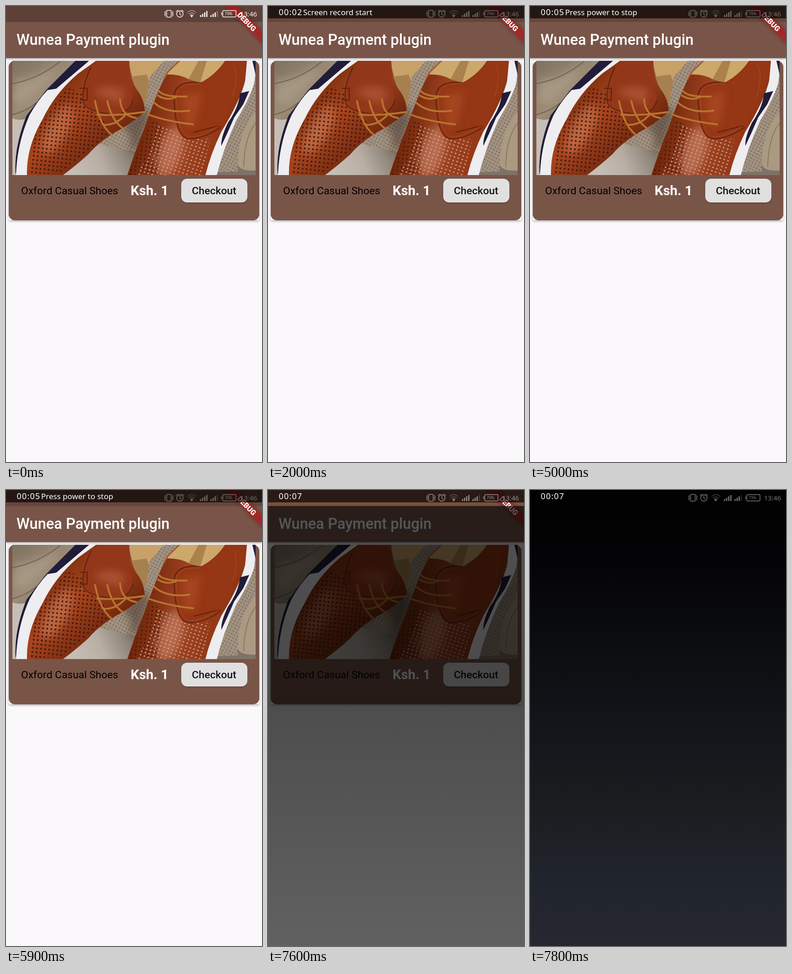
An HTML page that plays this animation: 561x998 px, repeating every 8 s.

```html
<!DOCTYPE html>
<html lang="en">
<head>
<meta charset="utf-8">
<title>Payment plugin demo</title>
<style>
  html, body { margin: 0; width: 100%; height: 100%; overflow: hidden; background: #faf8fb; }
  svg { display: block; width: 561px; height: 998px; }
  text { font-family: Roboto, sans-serif; }
  .hand { font-family: "Noto Sans", sans-serif; fill: #fff; }
  .line { fill: none; stroke-linecap: round; stroke-linejoin: round; }
</style>
</head>
<body>
<svg viewBox="0 0 561 998">
  <defs>
    <filter id="cardShadow" x="-5%" y="-5%" width="110%" height="112%">
      <feDropShadow dx="0" dy="2" stdDeviation="2.2" flood-opacity=".32"/>
    </filter>
    <filter id="buttonShadow" x="-5%" y="-10%" width="110%" height="130%">
      <feDropShadow dx="0" dy="1.5" stdDeviation="1.2" flood-opacity=".3"/>
    </filter>
    <filter id="ribbonShadow" x="-20%" y="-60%" width="140%" height="220%">
      <feDropShadow dx="0" dy="0" stdDeviation="4" flood-opacity=".5"/>
    </filter>
    <filter id="soft" x="-40%" y="-40%" width="180%" height="180%"><feGaussianBlur stdDeviation="9"/></filter>
    <clipPath id="photo"><path d="M14 120H547V370H14Z"/></clipPath>
    <clipPath id="leftClip"><use href="#leftUpper"/></clipPath>
    <clipPath id="rightClip"><use href="#rightUpper"/></clipPath>
    <linearGradient id="floor" gradientUnits="userSpaceOnUse" x1="150" y1="370" x2="280" y2="310">
      <stop offset="0" stop-color="#c6beb5"/><stop offset=".45" stop-color="#b8aea4"/>
      <stop offset="1" stop-color="#7f7367"/>
    </linearGradient>
    <linearGradient id="leftLeather" gradientUnits="userSpaceOnUse" x1="80" y1="210" x2="205" y2="335">
      <stop offset="0" stop-color="#80300f"/><stop offset=".4" stop-color="#a8451f"/>
      <stop offset="1" stop-color="#6c250d"/>
    </linearGradient>
    <linearGradient id="rightLeather" gradientUnits="userSpaceOnUse" x1="290" y1="270" x2="480" y2="310">
      <stop offset="0" stop-color="#702609"/><stop offset=".45" stop-color="#a04322"/>
      <stop offset="1" stop-color="#923513"/>
    </linearGradient>
    <linearGradient id="tanShoe" x1="0" y1="0" x2="1" y2="1">
      <stop offset="0" stop-color="#7f7160"/><stop offset=".5" stop-color="#9c8c77"/>
      <stop offset="1" stop-color="#675949"/>
    </linearGradient>
    <pattern id="mesh" width="7" height="7" patternUnits="userSpaceOnUse" patternTransform="rotate(28)">
      <path fill="#a19180" d="M0 0H7V7H0Z"/><circle cx="3.5" cy="3.5" r="1.6" fill="#776756"/>
    </pattern>
    <pattern id="holes" width="9" height="9" patternUnits="userSpaceOnUse" patternTransform="rotate(6)">
      <circle cx="4.5" cy="4.5" r="2" fill="#401408"/>
    </pattern>
    <pattern id="paleHoles" width="9" height="8" patternUnits="userSpaceOnUse" patternTransform="rotate(18)">
      <ellipse cx="4.5" cy="4" rx="2" ry="1.4" fill="#c4a595"/>
    </pattern>
    <linearGradient id="dimFill" x2="0" y2="1">
      <stop offset="0" stop-opacity=".66"/><stop offset=".45" stop-opacity=".69"/>
      <stop offset="1" stop-opacity=".61"/>
    </linearGradient>
    <linearGradient id="nightFill" x2="0" y2="1">
      <stop offset="0" stop-color="#020001"/><stop offset=".15" stop-color="#040406"/>
      <stop offset=".3" stop-color="#0a0b0d"/><stop offset=".52" stop-color="#12161a"/>
      <stop offset=".7" stop-color="#1b1d20"/><stop offset=".85" stop-color="#20242c"/>
      <stop offset="1" stop-color="#262831"/>
    </linearGradient>
  </defs>

  <path fill="#faf8fb" d="M0 0H561V998H0Z"/>

  <!-- app bar -->
  <path fill="#795548" d="M0 0H561V114H0Z" filter="url(#cardShadow)"/>
  <path id="statusBar" fill="#5d4037" d="M0 0H561V35H0Z"/>
  <text x="23" y="85" font-size="32.7" font-weight="500" fill="#fff">Wunea Payment plugin</text>

  <!-- product card -->
  <rect x="6" y="120" width="549" height="349" rx="3" fill="#fff" filter="url(#cardShadow)"/>
  <rect x="6" y="120" width="549" height="349" rx="13" fill="#795548"/>

  <g clip-path="url(#photo)">
    <path fill="url(#floor)" d="M14 120H547V370H14Z"/>
    <path fill="url(#tanShoe)" d="M14 120H165L90 190 48 246Q30 252 14 246Z"/>
    <path fill="#b3a48f" opacity=".6" filter="url(#soft)" d="M20 160Q60 165 115 128L95 165 40 215 14 210Z"/>
    <path class="line" stroke="#6d604f" stroke-width="2" d="M14 170Q70 160 118 122M14 238Q45 230 66 212"/>
    <path fill="url(#mesh)" d="M300 150 345 120H385L350 160 322 215 288 320Q245 312 200 300L250 262Z"/>
    <path fill="#3c2c20" opacity=".5" filter="url(#soft)" d="M303 215 315 240 292 310 268 320Q285 270 250 268Z"/>
    <path fill="url(#mesh)" d="M547 140V262Q505 300 508 362L455 364 490 270Z"/>
    <path fill="#ab9a82" d="M547 232Q508 276 508 345Q510 362 547 360Z"/>
    <path class="line" stroke="#89785f" stroke-width="2" d="M547 256Q522 288 521 352"/>

    <!-- left shoe -->
    <path fill="#211c38" d="M152 120H200L110 188 60 240 30 330 21 369Q17 310 45 240L88 184Z"/>
    <path fill="#eeedf0" d="M182 120H204Q140 165 108 212Q60 290 47 370H22Q24 300 52 238Q70 206 91 184L110 181Z"/>
    <path fill="#c8a168" d="M268 120H346L316 154 305 216 283 182Z"/>
    <path fill="#a6804f" d="M272 155 308 150 314 165 305 216 283 182Z"/>
    <path id="leftUpper" fill="url(#leftLeather)" d="M197 120H270Q272 160 286 182Q303 203 304 230Q290 246 254 268Q206 294 180 325Q152 350 125 370H46Q44 310 80 248Q108 190 158 148Z"/>
    <g clip-path="url(#leftClip)">
      <ellipse cx="112" cy="270" rx="22" ry="60" transform="rotate(28 112 270)" fill="#cf8360" opacity=".55" filter="url(#soft)"/>
      <path fill="url(#holes)" d="M133 178 165 188 176 226 208 240 228 276 178 320 120 367H50Q50 300 82 248Z"/>
      <path fill="#93371a" d="M186 135Q165 180 170 212Q176 232 245 238Q272 230 278 206Q270 160 270 120H210Z"/>
      <path fill="#bd6844" opacity=".55" filter="url(#soft)" d="M190 190Q220 165 262 185L250 215Z"/>
      <path class="line" stroke="#5b200d" stroke-width="2" d="M186 135Q164 180 170 212Q176 232 245 238Q272 230 278 206M162 180H178V206H162"/>
    </g>
    <path class="line" stroke="#b9742f" stroke-width="4" d="M195 208Q206 262 232 282M222 208Q232 252 257 268M250 204Q252 240 285 245M200 238Q250 240 303 232M212 260Q240 262 262 238"/>

    <!-- right shoe -->
    <path fill="#cca86b" d="M352 150 380 120H486L455 155 425 170Z"/>
    <path fill="#ab824b" d="M400 160 422 120H440L425 170Z"/>
    <path id="rightUpper" fill="url(#rightLeather)" d="M350 150Q378 148 400 160Q420 168 428 167Q460 150 480 120H530Q526 172 506 212Q470 285 440 370H266Q282 320 303 268Q325 205 346 160Z"/>
    <path class="line" stroke="#a9572e" stroke-width="3" d="M346 160 354 145 380 120"/>
    <g clip-path="url(#rightClip)">
      <ellipse cx="360" cy="318" rx="25" ry="58" transform="rotate(18 360 318)" fill="#d18c72" opacity=".55" filter="url(#soft)"/>
      <path fill="url(#holes)" opacity=".8" d="M318 250 346 262 330 370H268Z"/>
      <path fill="url(#paleHoles)" d="M334 258 382 282Q405 294 448 290L428 370H282Q320 325 334 258Z"/>
      <path fill="#953614" d="M428 167Q370 162 368 198Q370 282 396 290Q425 295 470 266L540 120H480Z"/>
      <path fill="#b6572f" opacity=".5" filter="url(#soft)" d="M385 195 430 185 415 260 392 268Z"/>
      <path class="line" stroke="#5b200d" stroke-width="2" d="M428 167Q370 162 368 198Q370 282 396 290Q425 295 470 266M412 276 468 262"/>
      <path class="line" stroke="#b4623c" stroke-width="1" stroke-dasharray="3 3" d="M425 171Q375 168 373 198Q376 278 399 285Q425 290 468 260M500 130Q510 160 496 200"/>
    </g>
    <path class="line" stroke="#b9742f" stroke-width="4" d="M335 186Q346 200 396 198M333 196Q352 208 372 200M325 212Q352 236 402 229M313 238Q350 252 410 259"/>
    <path fill="#eeedf0" d="M528 120H541Q550 145 543 172Q535 200 505 250Q477 310 462 370H437Q448 325 472 275Q512 210 524 165Z"/>
    <path fill="#211c38" d="M513 191 533 186 520 215 500 244 486 276 472 306Q470 290 486 256Q510 222 513 191Z"/>
    <path fill="#211c38" d="M540 120H547V150Z"/>
  </g>

  <text x="33" y="412" font-size="22.9">Oxford Casual Shoes</text>
  <text x="273" y="414" font-size="29.4" font-weight="700" fill="#fff">Ksh. 1</text>
  <rect x="384" y="378" width="145" height="52" rx="13" fill="#e0e0e0" filter="url(#buttonShadow)"/>
  <text x="456" y="412" font-size="22.9" font-weight="500" text-anchor="middle" fill="#141414">Checkout</text>

  <!-- debug ribbon -->
  <g transform="translate(527.5 34.5) rotate(45)">
    <path d="M-65 -9.400H65V9.400H-65Z" fill="#b71c1c" fill-opacity=".64" filter="url(#ribbonShadow)"/>
    <text y="5.700" font-size="16" font-weight="900" text-anchor="middle" fill="#fff">DEBUG</text>
  </g>

  <path id="recordBar" d="M0 0H561V27H0Z"/>
  <path id="dim" fill="url(#dimFill)" d="M0 35H561V998H0Z"/>
  <path id="night" fill="url(#nightFill)" d="M0 0H561V998H0Z"/>

  <!-- status icons -->
  <g id="icons">
    <g class="line" stroke="#fff" stroke-width="1.500">
      <rect x="352" y="9.500" width="10" height="15" rx="1.500"/>
      <path d="M349 12l-1 3 1.500 2-1.500 2 1 3M365 12l1 3-1.500 2 1.500 2-1 3"/>
      <circle cx="381" cy="17.500" r="7"/>
      <path d="M381 13V18L384 20M373 12 377 9M389 12 385 9"/>
      <path opacity=".55" d="M398 14Q407 6 416 14M401 17.500Q407 12 413 17.500"/>
      <path d="M404 20.500Q407 18 410 20.500"/>
      <rect x="475" y="10" width="29" height="14" rx="2"/>
      <path d="M472.500 14.500V19.500"/>
    </g>
    <circle cx="407" cy="22.500" r="2" fill="#fff"/>
    <g id="signal" fill="#fff"></g>
    <text class="hand" x="488" y="20" font-size="8.500" text-anchor="middle">79%</text>
    <text class="hand" x="513" y="22.500" font-size="14.500">13:46</text>
  </g>

  <g id="recordText">
    <text id="counter" class="hand" x="23.500" y="20" font-size="18" letter-spacing="1.200"></text>
    <text id="message" class="hand" x="77" y="20" font-size="17"></text>
  </g>
</svg>

<script>
const LOOP = 8000;

// Each row holds from its time until the next one.
const steps = [
  { at: 0,    recording: false, icons: 0.95, message: "", dim: 0, night: 0 },
  { at: 900,  recording: true,  icons: 0.36, message: "Screen record start", dim: 0, night: 0 },
  { at: 5000, recording: true,  icons: 0.36, message: "Press power to stop", dim: 0, night: 0 },
  { at: 7000, recording: true,  icons: 0.36, message: "", dim: 0, night: 0 },
  { at: 7600, recording: true,  icons: 0.5,  message: "", dim: 1, night: 0 },
  { at: 7700, recording: true,  icons: 0.48, message: "", dim: 1, night: 0.55 },
  { at: 7800, recording: true,  icons: 0.46, message: "", dim: 1, night: 1 },
];

const el = id => document.getElementById(id);

function addSignal(x, lastOpacity) {
  for (let i = 0; i < 4; i++) {
    const bar = document.createElementNS("http://www.w3.org/2000/svg", "rect");
    const height = 4 + 3 * i;
    const attributes = { x: x + 4.6 * i, y: 24 - height, width: 2.6, height, opacity: i < 3 ? 1 : lastOpacity };
    for (const name in attributes) bar.setAttribute(name, attributes[name]);
    el("signal").append(bar);
  }
}

function draw(time) {
  const step = steps.findLast(s => time >= s.at);
  const seconds = Math.max(1, Math.floor(time / 1000));
  el("counter").textContent = "00:0" + seconds;
  el("message").textContent = step.message;
  el("recordText").style.opacity = step.recording ? 1 : 0;
  el("recordBar").style.opacity = step.recording ? 0.67 : 0;
  el("statusBar").style.fill = step.dim ? "#7a4f3e" : step.recording ? "#67463b" : "#5d4037";
  el("icons").style.opacity = step.icons;
  el("dim").style.opacity = step.dim;
  el("night").style.opacity = step.night;
}

addSignal(425, 1);
addSignal(448, 0.3);

const start = performance.now();
function tick() {
  draw((performance.now() - start) % LOOP);
  requestAnimationFrame(tick);
}
tick();
</script>
</body>
</html>
```
